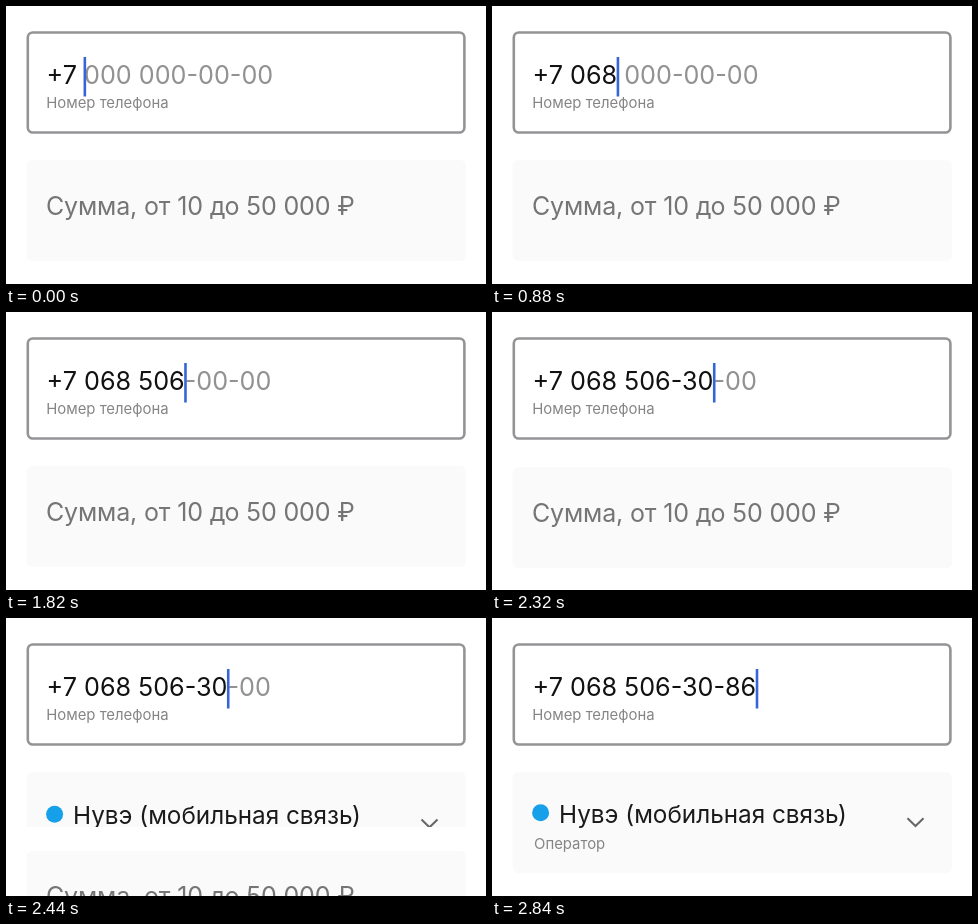
An HTML page that plays this animation: 480 by 278 pixels, repeating every 3280 ms.

```html
<!DOCTYPE html>
<html lang="ru">
<head>
<meta charset="utf-8">
<title>Ввод номера телефона</title>
<style>
  html, body { margin: 0; width: 100%; height: 100%; overflow: hidden; background: #fff; }
  svg { display: block; width: 100vw; height: 100vh; }
  text { font-family: Inter, Roboto, "Liberation Sans", sans-serif; white-space: pre; }
  .phone { font-size: 25.2px; fill: #111; }
  .sum { font-size: 25px; letter-spacing: -.006em; fill: #757575; }
  .name { font-size: 24.3px; fill: #1a1a1a; }
  .label { font-size: 14.9px; fill: #858585; }
  .panel { fill: #fafafa; }
</style>
</head>
<body>
<svg viewBox="0 0 480 278">
  <defs>
    <clipPath id="reveal"><rect id="window" x="0" y="150" width="480" height="0"/></clipPath>
  </defs>

  <rect x="21.8" y="26.5" width="436.6" height="100" rx="5" fill="#fff" stroke="#949496" stroke-width="2.6"/>
  <text class="phone" x="40.6" y="78"><tspan id="typed"></tspan><tspan id="rest" fill="#929292"></tspan></text>
  <text class="label" x="40.2" y="102">Номер телефона</text>
  <rect id="caret" y="51" width="2.6" height="39.5" fill="#3566d6"/>

  <g clip-path="url(#reveal)">
    <rect class="panel" x="20.5" y="154" width="439.5" height="101" rx="6"/>
    <g id="operator">
      <circle cx="48.6" cy="194.8" r="8.5" fill="#16a0ea"/>
      <text class="name" x="67" y="205">Нувэ (мобильная связь)</text>
      <text class="label" x="42" y="230.5">Оператор</text>
      <path d="M415.5 200.2L423.5 208L431.5 200.2" fill="none" stroke="#666" stroke-width="2"/>
    </g>
  </g>

  <g id="amount">
    <rect class="panel" x="20.5" y="154" width="439.5" height="101" rx="6"/>
    <text class="sum" x="40" y="208.5">Сумма, от 10 до 50 000 ₽</text>
  </g>
</svg>
<script>
  const LOOP = 3280, TICK = 20;
  const NUMBER = "+7\u00a0068\u00a0506-30-86";
  const MASK = "+7\u00a0000\u00a0000-00-00";
  const PREFIX = 3;
  const KEYS = [220, 440, 840, 1200, 1460, 1820, 2000, 2320, 2600, 2780];
  const SLIDE = { start: 2306, length: 233, distance: 128 };

  const el = id => document.getElementById(id);
  const typed = el("typed"), rest = el("rest"), caret = el("caret");
  const amount = el("amount"), operator = el("operator"), opening = el("window");

  // String position just after the given count of entered digits
  function endOf(count) {
    let end = PREFIX;
    while (count > 0) if (/\d/.test(NUMBER[end++])) count--;
    return end;
  }

  function drawPhone(t) {
    const end = endOf(KEYS.filter(k => t >= k).length);
    typed.textContent = NUMBER.slice(0, end);
    rest.textContent = MASK.slice(end);
    caret.setAttribute("x", 40.1 + typed.getComputedTextLength());
  }

  function drawSlide(t) {
    const p = Math.min(1, Math.max(0, (t - SLIDE.start) / SLIDE.length));
    const eased = (1 - Math.cos(Math.PI * p)) / 2;
    const shift = SLIDE.distance * eased;
    amount.setAttribute("transform", `translate(0 ${shift})`);
    operator.setAttribute("transform", `translate(0 ${3.5 * (1 - eased)})`);
    // The opening follows the upper edge of the amount field, less the gap
    opening.setAttribute("height", Math.max(0, shift - 20));
  }

  function draw(time) {
    const t = Math.floor((time % LOOP) / TICK) * TICK;
    drawPhone(t);
    drawSlide(t);
  }

  const begin = performance.now();
  function loop() {
    draw(performance.now() - begin);
    requestAnimationFrame(loop);
  }
  loop();
</script>
</body>
</html>
```
